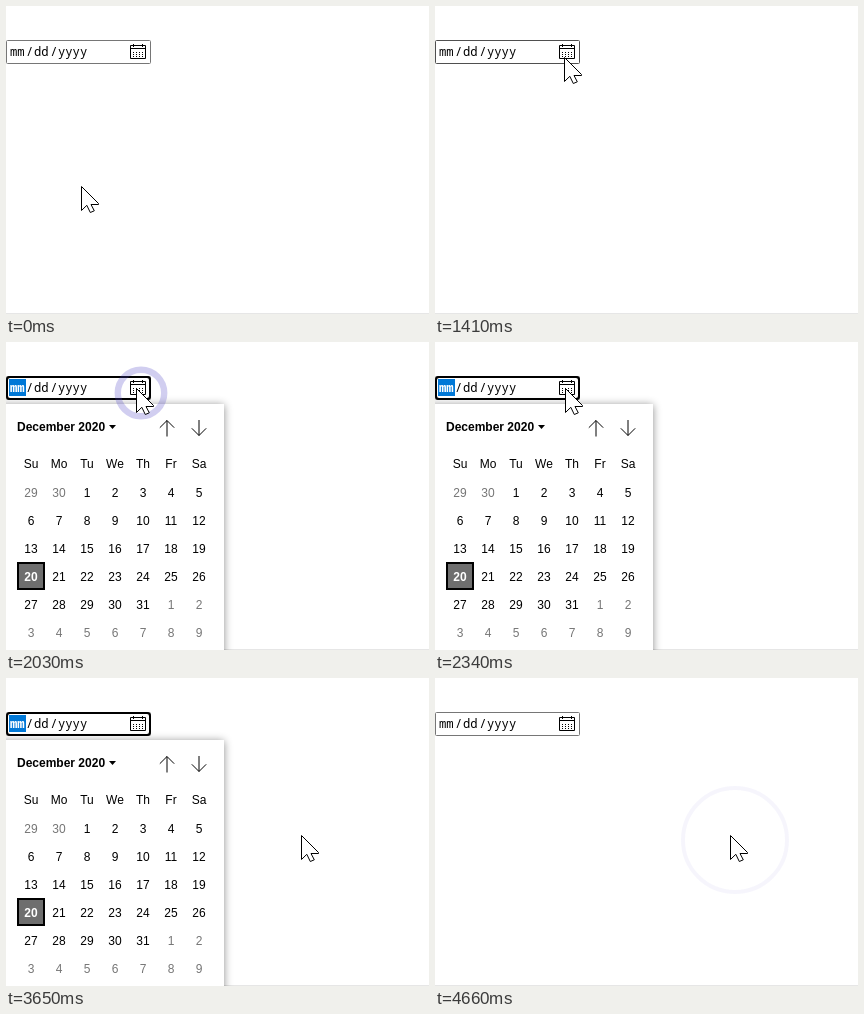
These frames come from a looping animation (423 px wide and 308 px high, 5.82 s). An HTML page:

```html
<!DOCTYPE html>
<html lang="en">
<head>
<meta charset="utf-8">
<title>Date picker</title>
<style>
  html, body { margin: 0; width: 100%; height: 100%; overflow: hidden; background: #fff; }
  svg { display: block; width: 100%; height: 100%; }
  .mono { font: 12.2px "Noto Sans Mono", monospace; }
  .cal { font: 12px "Liberation Sans", Arial, sans-serif; }
  .bold { font-weight: bold; }
  .mid { text-anchor: middle; }
  .line { fill: none; stroke: #000; }
  #popup, #focus, #yellow, #ring { opacity: 0; }
  #panel { filter: drop-shadow(0 1px 4px rgba(0, 0, 0, .45)); }
</style>
</head>
<body>
<svg viewBox="0 0 423 308">
  <rect y="307" width="423" height="1" fill="#e6e6e6"/>

  <rect id="border" x=".5" y="34.5" width="144" height="23" rx="1" fill="#fff" stroke="#767676"/>
  <g id="focus">
    <rect x="1" y="35" width="143" height="22" rx="3" fill="#fff" stroke="#000" stroke-width="2"/>
    <rect x="3" y="37" width="17" height="17" fill="#0078d7"/>
  </g>
  <g class="mono">
    <text id="month" x="4" y="50">mm</text>
    <text x="20" y="50">/</text>
    <text x="28" y="50">dd</text>
    <text x="44.3" y="50">/</text>
    <text x="52" y="50">yyyy</text>
  </g>
  <g id="icon">
    <path class="line" d="M124.5 39.5h15v13h-15zM124.5 42.5h15M127.5 38v3M136.5 38v3"/>
  </g>

  <g id="popup" class="cal">
    <rect id="panel" x="-8" y="62" width="226" height="260" fill="#fff"/>
    <text class="bold" x="11" y="89">December 2020</text>
    <path d="M103 83h7l-3.500 4z"/>
    <path class="line" d="M161 94.500v-16M153.800 85.700l7.200-7.200l7.200 7.200M193 78v15.500M185.800 86.300l7.200 7.200l7.200-7.200"/>
    <rect x="12" y="221" width="26" height="26" fill="#6e6e6e" stroke="#000" stroke-width="2"/>
  </g>

  <circle id="yellow" r="18" fill="#ff0" fill-opacity=".5"/>
  <circle id="ring" fill="none" stroke="rgb(80,70,200)"/>
  <path id="cursor" fill="#fff" stroke="#000"
    d="M.5 .5V24.500L5.800 19.300L9.300 26.500L13.300 24.800L10 18.500H17.500V17.500Z"/>
</svg>
<script>
const LOOP = 5820, STEP = 76;
const $ = id => document.getElementById(id);

function add(parent, tag, attrs, text = '') {
  const el = document.createElementNS('http://www.w3.org/2000/svg', tag);
  for (const k in attrs) el.setAttribute(k, attrs[k]);
  el.textContent = text;
  parent.append(el);
}

// Icon dots
for (let i = 0; i < 12; i++) {
  add($('icon'), 'rect', { x: 127 + i % 4 * 3, y: 46 + (i >> 2) * 2, width: 1, height: 1 });
}

// Month grid
['Su', 'Mo', 'Tu', 'We', 'Th', 'Fr', 'Sa'].forEach((name, i) =>
  add($('popup'), 'text', { class: 'mid', x: 25 + 28 * i, y: 126 }, name));
for (let i = 0; i < 42; i++) {
  const day = new Date(2020, 10, 29 + i);
  const today = i === 21;
  add($('popup'), 'text', {
    class: today ? 'mid bold' : 'mid',
    x: 25 + 28 * (i % 7),
    y: 155 + 28 * Math.floor(i / 7),
    fill: today ? '#fff' : day.getMonth() === 11 ? '#000' : '#767676'
  }, day.getDate());
}

// Each step holds until the next one: [ms, style]
const anims = [];
function play(id, steps) {
  const frames = steps.map(([t, style]) => ({ ...style, offset: t / LOOP, easing: 'step-end' }));
  frames.push({ ...steps[steps.length - 1][1], offset: 1 });
  anims.push($(id).animate(frames, { duration: LOOP, iterations: Infinity }));
}
const tick = (t, i) => Math.floor((t + i * STEP) / 10) * 10;
const at = (x, y) => ({ transform: `translate(${x}px, ${y}px)` });
const toggle = (a, b, ...times) => [0, ...times].map((t, i) => [t, i % 2 ? b : a]);
const show = (...times) => toggle({ opacity: 0 }, { opacity: 1 }, ...times);

// Cursor moves: start, steps, end point, easing power for x and y
const moves = [
  [950, 8, 130, 48, .93, 1.37],
  [1650, 1, 130, 46, 1, 1],
  [2570, 1, 132, 46, 1, 1],
  [2730, 8, 280, 145, 2.13, 3.3],
  [3340, 5, 295, 157, 1, 1]
];
let x0 = 75, y0 = 180;
const path = [[0, at(x0, y0)]];
for (const [t, n, x, y, kx, ky] of moves) {
  for (let i = 1; i <= n; i++) {
    const s = Math.sin(i / n * Math.PI / 2);
    path.push([tick(t, i - 1), at(
      Math.round(x0 + (x - x0) * s ** kx),
      Math.round(y0 + (y - y0) * s ** ky)
    )]);
  }
  [x0, y0] = [x, y];
}
play('cursor', path);

play('focus', show(1880, 4260));
play('popup', show(2030, 4260));
play('month', toggle({ fill: '#000', fontWeight: 400 }, { fill: '#fff', fontWeight: 600 }, 1880, 4260));
play('border', toggle({ stroke: '#767676' }, { stroke: '#4f4f4f' }, 1410, 2810));

// Clicks: start, point, end of the ripple
const clicks = [[1880, 130, 46, 2340], [4260, 295, 157, LOOP]];
const hidden = { opacity: 0, r: '4px', strokeWidth: '8px', ...at(0, 0) };
const ring = [[0, hidden]];
const spot = [[0, { opacity: 0, ...at(0, 0) }]];
for (const [t, x, y, end] of clicks) {
  spot.push([t, { opacity: 1, ...at(x, y) }], [t + 85, { opacity: 0, ...at(x, y) }]);
  for (let i = 0; i < 6; i++) {
    const p = i / 5;
    ring.push([tick(t, i), {
      opacity: .4 - .35 * p,
      r: 4 + 48 * p + 'px',
      strokeWidth: 8 - 4 * p + 'px',
      ...at(x + 5, y + 5)
    }]);
  }
  if (end < LOOP) ring.push([end, hidden]);
}
play('yellow', spot);
play('ring', ring);

const start = document.timeline.currentTime;
anims.forEach(a => a.startTime = start);
</script>
</body>
</html>
```
